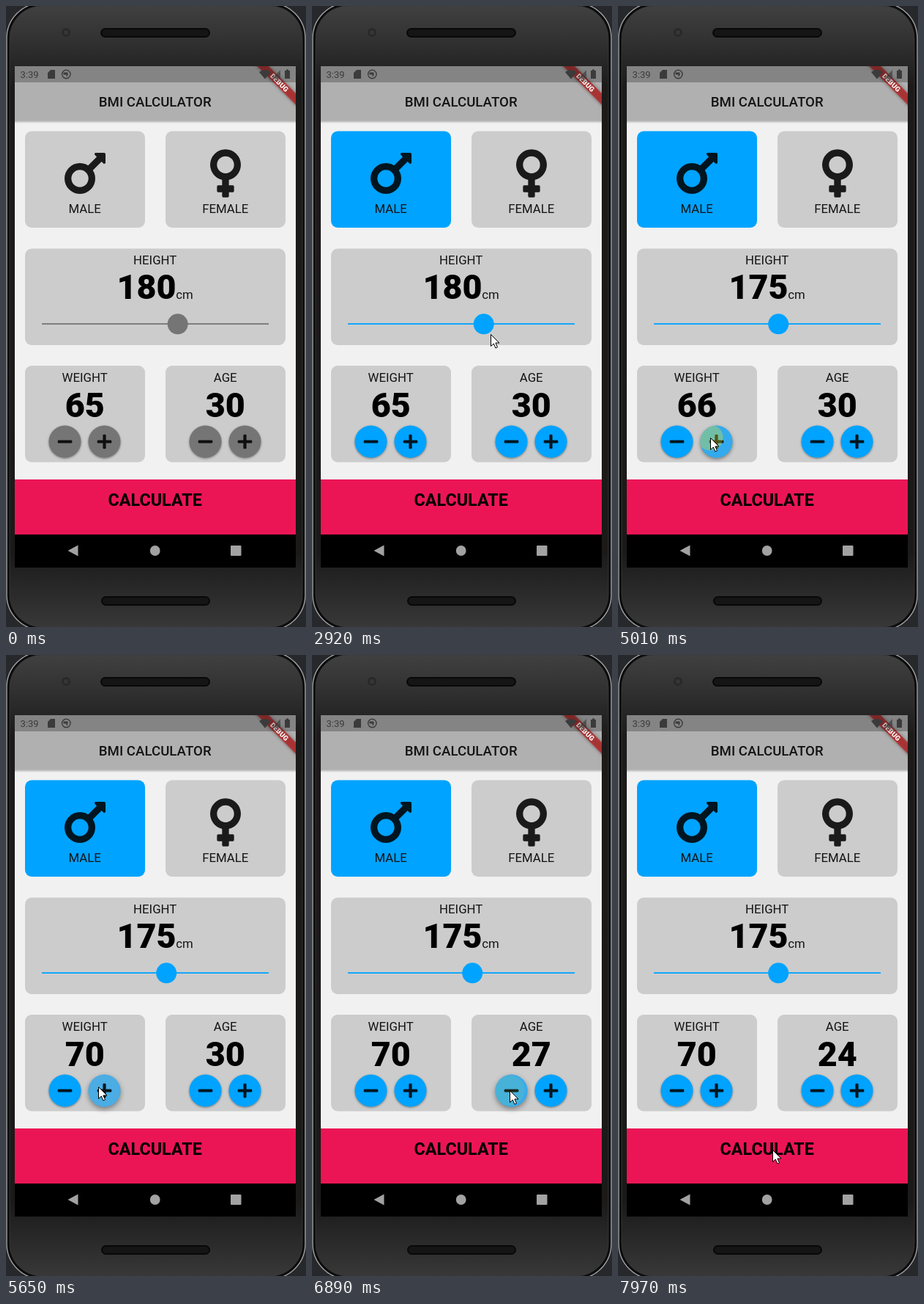
These frames come from a looping animation (410x846 px, 8000 ms). An HTML page:

```html
<!DOCTYPE html>
<html lang="en">
<head>
<meta charset="utf-8">
<title>BMI calculator</title>
<style>
  html, body { margin: 0; width: 100%; height: 100%; overflow: hidden; background: #27282c; }
  svg { display: block; width: 410px; height: 846px; font-family: Roboto, sans-serif; }
  text { text-anchor: middle; }
  .label { font-size: 16.8px; fill: #141414; }
  .number { font-size: 46.67px; font-weight: 900; }
  .card { fill: #ccc; }
  .accent { fill: #757575; }
  .on .accent, .on #male { fill: #00a3ff; }
  .ink { opacity: .87; }
</style>
</head>
<body>
<svg id="stage" viewBox="0 0 410 846">
  <defs>
    <linearGradient id="body" x2="0" y2="1">
      <stop offset="0" stop-color="#404040"/>
      <stop offset=".05" stop-color="#333"/>
      <stop offset=".1" stop-color="#242424"/>
      <stop offset=".13" stop-color="#1d1b1a"/>
      <stop offset=".88" stop-color="#1b1a19"/>
      <stop offset=".92" stop-color="#242424"/>
      <stop offset="1" stop-color="#383838"/>
    </linearGradient>
    <linearGradient id="barShadow" x2="0" y2="1">
      <stop offset="0" stop-opacity=".28"/>
      <stop offset="1" stop-opacity="0"/>
    </linearGradient>
    <clipPath id="screen"><rect x="12" y="82" width="384" height="683"/></clipPath>
    <clipPath id="disc"><circle r="22"/></clipPath>
  </defs>

  <!-- phone -->
  <rect x="1" y="-4" width="408" height="854" rx="48" fill="#0c0c0c" stroke="#a8a8a8" stroke-width="1.3"/>
  <rect x="5" y="0" width="400" height="846" rx="44" fill="url(#body)" stroke="#3c3c3c" stroke-width=".8"/>
  <g fill="#151515" stroke="#080808" stroke-width="2">
    <rect x="130" y="31" width="148" height="11" rx="5.5"/>
    <rect x="131" y="805" width="147" height="11" rx="5.5"/>
  </g>
  <circle cx="82" cy="36" r="6" fill="#292929"/>
  <circle cx="82" cy="36" r="3" fill="#353638"/>

  <g clip-path="url(#screen)">
    <rect x="12" y="82" width="384" height="683" fill="#f1f1f1"/>
    <rect x="12" y="156" width="384" height="4" fill="url(#barShadow)"/>
    <rect x="12" y="82" width="384" height="74" fill="#b0b0b0"/>
    <text x="203.7" y="137.3" font-size="18.67" font-weight="500" fill="#141414">BMI CALCULATOR</text>
    <g transform="translate(396 82) rotate(45)">
      <rect x="-70" y="26.1" width="140" height="11.2" fill="#b71c1c" fill-opacity=".75"
        style="filter:drop-shadow(0 0 2.5px #0007)"/>
      <text y="35" font-size="9.5" font-weight="900" fill="#fff">DEBUG</text>
    </g>

    <!-- status bar -->
    <rect x="12" y="82" width="384" height="22" opacity=".25"/>
    <g fill="#3b3b3b">
      <text x="32" y="98" font-size="13">3:39</text>
      <path d="M61 87h6v12h-10v-8z"/>
      <circle cx="82.3" cy="93" r="5.7" fill="none" stroke="#3b3b3b" stroke-width="1.4"/>
      <path d="M78.500 90.500h6v4l-2 2v-3h-4z"/>
      <path d="M346 90q8-6 16 0l-8 9.500z"/>
      <path d="M375 87v12h-11z" opacity=".65"/>
      <path d="M381 88h2v-1.500h3v1.500h2v11h-7z"/>
    </g>

    <!-- cards -->
    <g class="card">
      <rect id="male" x="26" y="170.500" width="164" height="131.500" rx="9"/>
      <rect x="218" y="170.500" width="164" height="131.500" rx="9"/>
      <rect x="26" y="330.500" width="356" height="131.500" rx="9"/>
      <rect x="26" y="490" width="164" height="131.500" rx="9"/>
      <rect x="218" y="490" width="164" height="131.500" rx="9"/>
    </g>
    <g class="ink" transform="translate(80 190.700) scale(.1458)">
      <circle cx="144" cy="304" r="112" fill="none" stroke="#000" stroke-width="64"/>
      <path d="M240 208L335 113" stroke="#000" stroke-width="64"/>
      <path d="M293 64h79q12 0 12 12v79c0 11-13 16-20 8l-79-79c-8-7-3-20 8-20z"/>
    </g>
    <g class="ink" transform="translate(279 190.700) scale(.1458)">
      <circle cx="144" cy="176" r="112" fill="none" stroke="#000" stroke-width="64"/>
      <rect x="112" y="300" width="64" height="180" rx="12"/>
      <rect x="64" y="368" width="160" height="64" rx="12"/>
    </g>
    <g class="label">
      <text x="107.700" y="282">MALE</text>
      <text x="299.700" y="282">FEMALE</text>
      <text x="203.700" y="351.700">HEIGHT</text>
      <text x="107.700" y="512">WEIGHT</text>
      <text x="299.700" y="512">AGE</text>
      <text x="244" y="399">cm</text>
    </g>
    <g class="number">
      <text id="height" x="192" y="399"></text>
      <text id="weight" x="107.700" y="560"></text>
      <text id="age" x="299.700" y="560"></text>
    </g>

    <!-- slider -->
    <g class="accent">
      <rect x="49" y="432.200" width="310" height="1.800"/>
      <circle id="halo" cy="433.300" opacity=".16"/>
      <circle id="thumb" cy="433.300" r="14"/>
    </g>
    <g id="buttons"></g>

    <rect x="12" y="645" width="384" height="75" fill="#eb1555"/>
    <text x="203.700" y="681.300" font-size="23.33" font-weight="700">CALCULATE</text>

    <!-- navigation -->
    <rect x="12" y="720" width="384" height="45"/>
    <g fill="#a2a2a2">
      <path d="M84.500 742L98.500 734.500V749.500z"/>
      <circle cx="203.700" cy="742" r="6.900"/>
      <rect x="307" y="735" width="14.500" height="14" rx="1"/>
    </g>
  </g>
  <path id="cursor" d="M.5.500V16.500l3.800-3.500 2.600 6 2.600-1.100-2.600-5.900h5.100z" fill="#fff" stroke="#000"/>
</svg>
<script>
const LOOP = 8000, START = 1140, STEP = 75.9;
const $ = id => document.getElementById(id);
const clamp = v => Math.max(0, Math.min(1, v));

// [time, x, y]
const cursorPath = [
  [1140, 257, 777], [1300, 200, 560], [1450, 122, 350], [1540, 100, 282], [1660, 115, 249],
  [2500, 115, 249], [2740, 185, 350], [2880, 244, 447], [2920, 244, 447], [2980, 250, 456], [3070, 237, 436],
  [3200, 235, 435], [3500, 202, 435], [3680, 206, 434], [3930, 219, 434],
  [4150, 219, 434], [4420, 165, 510], [4680, 114, 583], [4850, 126, 588],
  [5870, 126, 588], [6100, 190, 584], [6380, 270, 593],
  [7380, 270, 593], [7510, 258, 655], [7590, 240, 672], [7670, 225, 682], [7740, 215, 680], [7890, 211, 674], [8000, 211, 674]
];
const thumbPath = [[3200, 234.700], [3500, 202], [3680, 206], [3930, 219.200]];
const weightTaps = [5010, 5147, 5284, 5421, 5560];
const ageTaps = [6480, 6640, 6800, 6950, 7120, 7280];

function along(path, t) {
  if (t <= path[0][0]) return path[0].slice(1);
  const i = path.findIndex(p => p[0] > t);
  if (i < 0) return path[path.length - 1].slice(1);
  const a = path[i - 1], b = path[i], k = (t - a[0]) / (b[0] - a[0]);
  return a.slice(1).map((v, j) => v + (b[j + 1] - v) * k);
}

function addButton(x, plus) {
  const g = document.createElementNS('http://www.w3.org/2000/svg', 'g');
  g.setAttribute('transform', `translate(${x} 593.500)`);
  g.innerHTML = `<circle class="accent" r="22"/><circle r="22" fill="#bcbcbc" opacity="0"/>
    <g class="ink"><rect x="-9.800" y="-2.100" width="19.600" height="4.200" rx="1.400"/>
    ${plus ? '<rect x="-2.100" y="-9.800" width="4.200" height="19.600" rx="1.400"/>' : ''}</g>
    <g clip-path="url(#disc)"><circle fill="#ffeb00" opacity="0"/></g>`;
  $('buttons').append(g);
  const [face, glow, splash] = g.querySelectorAll('circle');
  return { x, face, glow, splash };
}
const [, weightPlus, ageMinus] = [[80.500, 0], [134.500, 1], [272.500, 0], [326.500, 1]].map(a => addButton(...a));
for (const face of document.querySelectorAll('#buttons .accent'))
  face.style.filter = 'drop-shadow(0 1.500px 1.500px #0006)';

function press(button, taps, t, strength, x, y) {
  const last = taps[taps.length - 1];
  const lift = clamp((t - taps[0] + 100) / 150) * clamp((last + 240 - t) / 150);
  button.glow.setAttribute('opacity', strength * lift);
  button.face.style.filter = `drop-shadow(0 ${1.5 + 2 * lift}px ${1.5 + 2 * lift}px #0006)`;
  // the ripple starts when the finger goes down, just before the count changes
  const down = taps.map(tap => tap - 95).filter(d => d <= t).pop();
  const age = down === undefined ? 1 : (t - down) / 140;
  button.splash.setAttribute('cx', x - button.x);
  button.splash.setAttribute('cy', y - 593.5);
  button.splash.setAttribute('r', 8 + 14 * clamp(age));
  button.splash.setAttribute('opacity', age < 1 ? .48 * clamp(2 - 2 * age) : 0);
}

function draw(now) {
  const real = now % LOOP;
  const t = real < START ? 0 : START + Math.floor((real - START + 15) / STEP) * STEP;
  const [x, y] = along(cursorPath, t);
  $('cursor').setAttribute('transform', `translate(${x} ${y})`);
  $('cursor').style.display = t ? '' : 'none';
  $('stage').classList.toggle('on', real >= 2230);

  const [thumb] = along(thumbPath, t);
  $('thumb').setAttribute('cx', thumb);
  $('halo').setAttribute('cx', thumb);
  $('halo').setAttribute('r', 23.5 * clamp((t - 3150) / 130) * clamp((4290 - t) / 150));
  $('height').textContent = Math.round(120 + (thumb - 49) / 3.1);

  const count = taps => taps.filter(tap => tap <= t).length;
  $('weight').textContent = 65 + count(weightTaps);
  $('age').textContent = 30 - count(ageTaps);
  press(weightPlus, weightTaps, t, .4, 126, 588);
  press(ageMinus, ageTaps, t, .29, 270, 593);
}

const begin = performance.now();
function tick() {
  draw(performance.now() - begin);
  requestAnimationFrame(tick);
}
tick();
</script>
</body>
</html>
```
